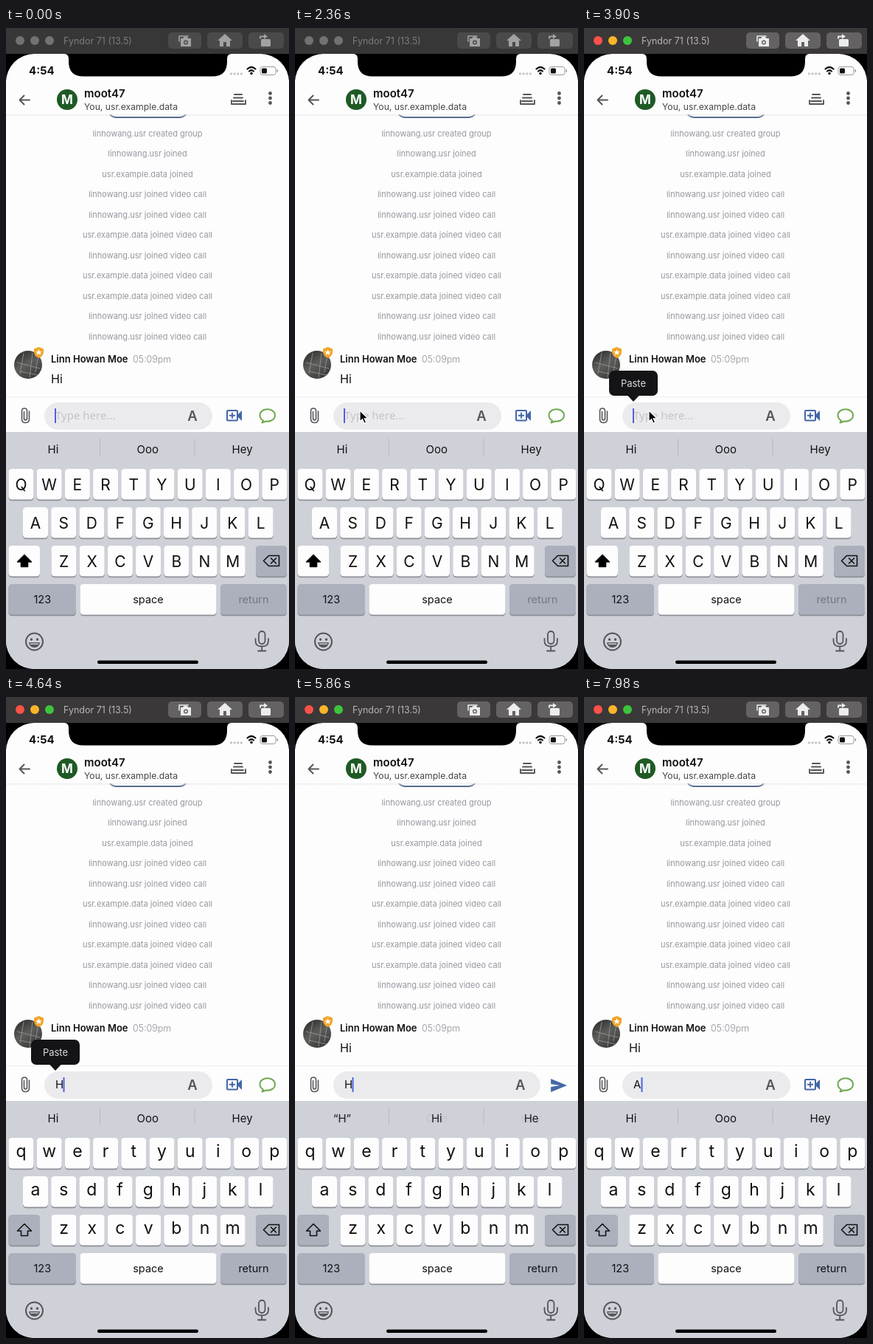
These frames come from a looping animation (384x868 px, 8000 ms). An HTML page:

```html
<!DOCTYPE html>
<html lang="en">
<head>
<meta charset="utf-8">
<title>Chat input</title>
<style>
  html, body { margin: 0; width: 100%; height: 100%; overflow: hidden; background: #000; }
  svg { display: block; width: 100%; height: 100%; }
  text { font-family: Inter, sans-serif; white-space: pre; }
  .line { fill: none; stroke-linecap: round; stroke-linejoin: round; }
</style>
</head>
<body>
<svg id="stage" viewBox="0 0 384 868" xmlns="http://www.w3.org/2000/svg"></svg>
<script>
const PAPER = '#fdfdfe', INK = '#111113', GREY = '#55565a', BOARD = '#ced1d8', DIM = '#abb0bc', BLUE = '#4466a6';
const LOOP = 8000;

const rect = (x, y, w, h, r, fill, more = '') =>
  `<rect x="${x}" y="${y}" width="${w}" height="${h}" rx="${r}" fill="${fill}" ${more}/>`;
const circle = (x, y, r, fill, more = '') => `<circle cx="${x}" cy="${y}" r="${r}" fill="${fill}" ${more}/>`;
const shape = (d, fill, more = '') => `<path d="${d}" fill="${fill}" ${more}/>`;
const line = (d, color, width = 2) => `<path class="line" d="${d}" stroke="${color}" stroke-width="${width}"/>`;
// Text placed by the middle of its capitals
const label = (str, x, cy, size, fill = INK, more = '') =>
  `<text x="${x}" y="${cy + size * 0.36}" font-size="${size}" fill="${fill}" ${more}>${str}</text>`;
const MID = 'text-anchor="middle"', BOLD = 'font-weight="700"', SEMI = 'font-weight="600"';
const group = (id, content, more = '') => `<g id="${id}" ${more}>${content}</g>`;

function windowBar(id, active) {
  const icon = active ? '#ececec' : '#a2a2a2';
  const button = active ? '#646263' : '#4b4a4b';
  const lights = active ? ['#fb5148', '#fbb52a', '#3ec43c'] : ['#737273', '#737273', '#737273'];
  return group(id,
    rect(0, 0, 384, 35, 0, active ? '#3a3839' : '#383738') +
    lights.map((c, i) => circle(19 + 20 * i, 17, 6, c)).join('') +
    label('Fyndor 71 (13.5)', 78, 17, 12.5, active ? '#b6b5b6' : '#7c7b7c') +
    [[220, 45], [273, 48], [329, 48]].map(([x, w]) => rect(x, 6, w, 22, 5, button)).join('') +
    line('M235 18V11H247', icon, 1.6) +
    shape('M237 14H240L241.500 12H246L247.500 14H251V25H237Z', icon) + circle(244, 19.500, 3, button) +
    circle(244, 19.500, 1.500, icon) +
    shape('M287 17L297 8L307 17H304V25H299V19H295V25H290V17Z', icon) +
    rect(346, 15, 13, 10, 1.500, icon) + line('M345 14V11.500H351', icon, 1.8) +
    shape('M350 8L355 11.500L350 15Z', icon));
}

function statusBar() {
  return label('4:54', 31, 58, 15, INK, BOLD) +
    [0, 1, 2, 3].map(i => rect(304 + 4.6 * i, 60.5, 3, 3, 1, '#c4c4c8')).join('') +
    line('M327.500 55.500Q333 50.500 338.500 55.500M330 58.500Q333 56 336 58.500', INK, 2.2) +
    circle(333, 61.5, 1.8, INK) +
    rect(345, 52.5, 21, 11, 3, 'none', 'stroke="#9a9a9e"') +
    rect(347, 54.5, 7, 7, 1.5, INK) + rect(367.5, 56, 1.500, 4, 1, '#9a9a9e');
}

function header() {
  return rect(138, 90, 109, 31, 12, 'none', 'stroke="#52678c" stroke-width="2"') +
    rect(0, 115, 384, 6, 0, 'url(#shade)') + rect(0, 70, 384, 47, 0, PAPER) +
    line('M32 97.500H18.500M24.500 91.500L18.500 97.500L24.500 103.500', GREY, 2) +
    circle(83, 97, 14, '#1f5a24') + label('M', 83, 97, 17, PAPER, MID + BOLD) +
    label('moot47', 106, 89, 15, INK, SEMI) +
    label('You, usr.example.data', 106, 106.5, 12.2, '#46464a') +
    line('M310 90H320M309 94.500H321M306 98V103H325V98M308 99H322', GREY, 1.9) +
    [88.5, 95, 101.5].map(y => circle(358.5, y, 2.4, GREY)).join('');
}

function messages() {
  const first = 'linhowang.usr', second = 'usr.example.data', call = ' joined video call';
  const notes = [first + ' created group', first + ' joined', second + ' joined',
    ...[0, 0, 1, 0, 1, 1, 0, 0].map(who => (who ? second : first) + call)];
  return notes.map((s, i) => label(s, 192, 143 + 27.5 * i, 11, '#96969e', MID)).join('') +
    circle(30, 456, 19, 'url(#photo)') +
    line('M15 453L46 461M19 465L43 470M24 440L19 468M36 440L32 473M43 448L40 466', '#9a9a9a', 0.8) +
    shape('M44.500 432L51 434.500V439Q51 444 44.500 447Q38 444 38 439V434.500Z', '#f2a52a') +
    shape('M44.500 435L45.700 438H49L46.400 440L47.400 443L44.500 441.200L41.600 443L42.600 440L40 438H43.300Z', PAPER) +
    label('Linn Howan Moe', 61, 448, 13, INK, SEMI) +
    label('05:09pm', 172, 448, 12.5, '#8e8e96', 'font-weight="300"') +
    label('Hi', 61, 475, 16);
}

function inputRow() {
  return rect(0, 499, 384, 1, 0, '#eeeef0') +
    line('M31.500 519V529.500Q31.500 534.500 26.500 534.500Q21.500 534.500 21.500 529.500V518.500Q21.500 515 25 515Q28.500 515 28.500 518.500V528.500Q28.500 531 26.500 531Q24.500 531 24.500 528.500V519.500', GREY, 1.6) +
    `<rect id="field" x="52" y="507" width="228" height="37" rx="18.500" fill="#ebebed"/>` +
    group('format', label('A', 253, 525, 18.5, GREY, MID + SEMI)) +
    `<text id="entry" y="530.400"></text>` + rect(66, 515, 2, 20, 0.5, '#4a64dc', 'id="caret"') +
    group('actions',
      rect(300, 518, 14, 13.5, 1, 'none', `stroke="${BLUE}" stroke-width="2"`) +
      shape('M315 523L320 518V532L315 527Z', BLUE) +
      line('M307 521.500V528M303.700 524.800H310.300', BLUE, 1.9) +
      line('M349 531.500Q344.500 529 344.500 524.500C344.500 513.500 365 513.500 365 524.500C365 532 356 533 353 532.500L347.500 534.500Z', '#6fa850', 2)) +
    group('send', shape('M347 517L369 526L347 535V528L359 526L347 524Z', BLUE));
}

// Small letters are set larger and sit higher on their key than capitals
function key(x, y, w, text, size, fill = PAPER, ink = INK, lift = 0) {
  return rect(x, y + 1.2, w, 42, 4.5, '#8c8f96') + rect(x, y, w, 41.500, 4.5, fill) +
    (text ? label(text, x + w / 2, y + 21 - lift, size, ink, MID) : '');
}

function keyboardState(id, upper) {
  const rows = [['qwertyuiop', 3.5, 597], ['asdfghjkl', 23, 649], ['zxcvbnm', 61.5, 701]];
  const [size, lift] = upper ? [21, 0] : [23, 3];
  const letters = rows.map(([chars, x, y]) =>
    [...(upper ? chars.toUpperCase() : chars)]
      .map((c, i) => key(x + 38.2 * i, y, 34, c, size, PAPER, INK, lift)).join('')).join('');
  const arrow = 'M25 713.500L34.500 723H29.500V729.500H20.500V723H15.500Z';
  return group(id, letters +
    key(3.5, 701, 42.5, '', 0, upper ? PAPER : DIM) +
    shape(arrow, upper ? '#000' : 'none', `stroke="${INK}" stroke-width="1.6" stroke-linejoin="round"`) +
    key(291, 753, 90, 'return', 14.5, DIM, upper ? '#75787f' : INK));
}

function keyboard() {
  const words = (id, list) => group(id, list.map((w, i) => label(w, 64 + 128.3 * i, 571, 15, INK, MID)).join(''));
  return rect(0, 547, 384, 330, 0, BOARD) +
    rect(127, 556, 1, 23, 0, '#b6b9c1') + rect(255.5, 556, 1, 23, 0, '#b6b9c1') +
    words('defaults', ['Hi', 'Ooo', 'Hey']) + words('guesses', ['“H”', 'Hi', 'He']) +
    keyboardState('upper', true) + keyboardState('lower', false) +
    key(339, 701, 42, '', 0, DIM) +
    line('M356.500 714.500H370.500V728.500H356.500L349.500 721.500ZM359.500 718L366.500 725M366.500 718L359.500 725', INK, 1.6) +
    key(3.5, 753, 91.5, '123', 14.5, DIM) + key(100.5, 753, 185, 'space', 14.5) +
    circle(38.5, 831, 11.5, 'none', `stroke="${GREY}" stroke-width="2"`) +
    circle(34.5, 828, 1.7, GREY) + circle(42.5, 828, 1.7, GREY) +
    shape('M31 832H46Q45 839 38.500 839Q32 839 31 832Z', GREY) + line('M33.500 834H43.500', BOARD, 1.4) +
    rect(343, 817, 8.5, 17, 4.2, 'none', `stroke="${GREY}" stroke-width="1.8"`) +
    line('M338.500 827V830Q338.500 837.500 347.200 837.500Q356 837.500 356 830V827M347.200 838V843M342 843.500H352.500', GREY, 1.8) +
    rect(124, 856.5, 137, 4.5, 2.2, '#000');
}

const stage = document.getElementById('stage');
stage.innerHTML = `<defs>
    <linearGradient id="photo" x2="0.600" y2="1"><stop stop-color="#242424"/><stop offset="0.550" stop-color="#5e5e5c"/><stop offset="1" stop-color="#3c3c3a"/></linearGradient>
    <linearGradient id="shade" x2="0" y2="1"><stop stop-color="#d2d2d6"/><stop offset="1" stop-color="${PAPER}" stop-opacity="0"/></linearGradient>
    <clipPath id="screen"><rect y="35" width="384" height="833" rx="38.500"/></clipPath>
  </defs>` +
  rect(0, 0, 384, 868, 0, '#000') +
  windowBar('idleBar', false) + windowBar('activeBar', true) +
  `<g clip-path="url(#screen)">` + rect(0, 35, 384, 833, 0, PAPER) + header() + statusBar() +
  messages() + inputRow() + keyboard() +
  shape('M79 35Q85 35 85 42V45.500Q85 65.500 105 65.500H280Q300 65.500 300 45.500V42Q300 35 306 35Z', '#000') + '</g>' +
  group('paste', rect(34, 464, 66, 34, 7, '#141416') + shape('M59 497.500H75L67 506Z', '#141416') +
    label('Paste', 67, 481, 13, '#dcdce0', MID)) +
  group('mouse', shape('M0 0V15L3.500 11.800L6 17.200L8.600 16L6.200 10.800H11Z', '#000', 'stroke="#fff" stroke-width="1.200"'));

const el = {};
stage.querySelectorAll('[id]').forEach(node => el[node.id] = node);
const set = (id, attrs) => { for (const name in attrs) el[id].setAttribute(name, attrs[name]); };
const show = (id, amount) => set(id, { opacity: +amount });

const progress = (t, from, to) => Math.min(1, Math.max(0, (t - from) / (to - from)));
const ease = p => p * p * (3 - 2 * p);
const pulse = (t, a, b, c, d) => ease(progress(t, a, b)) - ease(progress(t, c, d));

const FOCUSED = 2700, TYPED = 4500, CLEARED = 6800, SETTLED = 7060, RETYPED = 7750;

function draw(t) {
  const active = t >= FOCUSED;
  show('idleBar', !active);
  show('activeBar', active);

  const text = t >= RETYPED ? 'A' : t >= TYPED && t < CLEARED ? 'H' : '';
  const squeezed = t >= CLEARED && t < SETTLED;
  el.entry.textContent = text || (squeezed ? 'here...' : 'Type here...');
  set('entry', {
    x: squeezed ? 61 : 67,
    'font-size': squeezed ? 16.5 : 15,
    fill: text ? INK : '#c3c3c8',
    style: text ? '' : "font-family:'Noto Sans',sans-serif"
  });
  show('upper', !text);
  show('lower', text);

  const blinkStart = t >= RETYPED ? RETYPED : t >= SETTLED ? SETTLED : t >= TYPED ? TYPED : 0;
  const beat = (t - blinkStart) % 1000;
  set('caret', { x: text ? 77.5 : 66 });
  show('caret', !squeezed && (beat < 500 || beat > 850));

  // The interface answers a second after the first letter:
  // the menu closes, the field widens and the send arrow slides in
  const wide = pulse(t, 5600, 5870, 6850, 7090);
  set('field', { width: 228 + 53 * wide });
  set('format', { transform: `translate(${53 * wide})` });
  set('send', { transform: `translate(${53 * (1 - wide)})` });
  show('send', wide);
  show('actions', Math.max(0, 1 - 2 * wide));

  const guess = pulse(t, 5700, 5890, 6810, 6950);
  show('guesses', guess);
  show('defaults', 1 - guess);

  show('paste', pulse(t, 3300, 3450, 5560, 5710));
  const glide = ease(progress(t, 300, 800));
  set('mouse', { transform: `translate(${-14 + 102 * glide} ${640 - 122 * glide})` });
  show('mouse', t > 300 && t < TYPED);
}

function frame() {
  draw(performance.now() % LOOP);
  requestAnimationFrame(frame);
}
frame();
</script>
</body>
</html>
```
